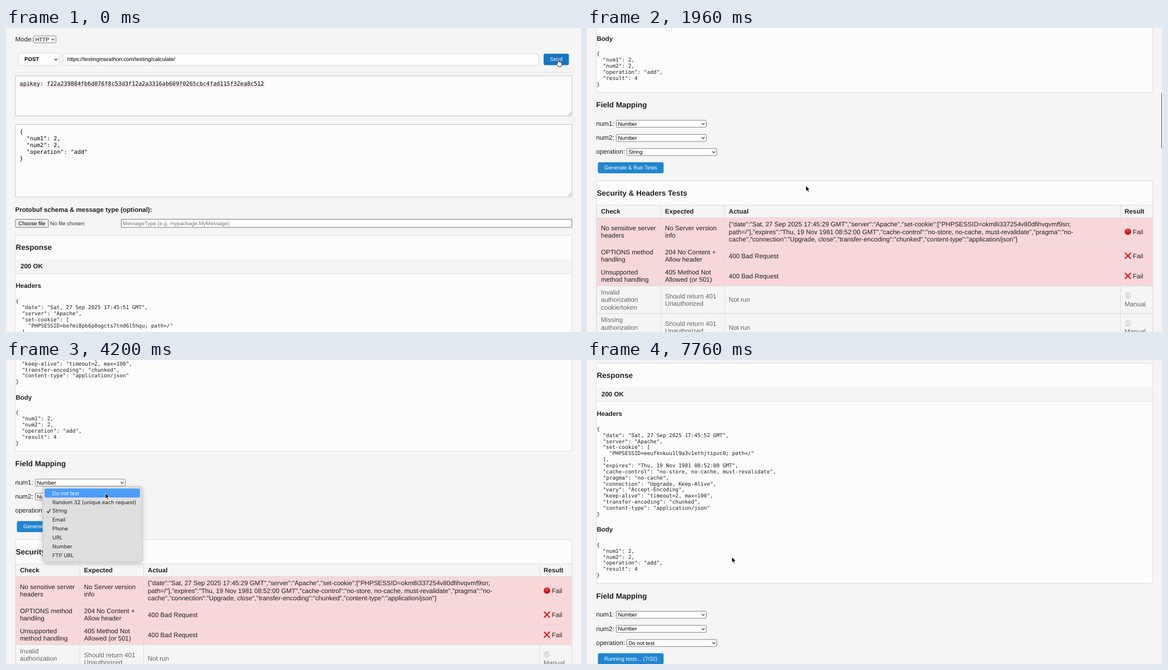
Recreate the animation shown at these times as an HTML page. Size 1030 px wide and 544 px high, loop 8000 ms.

```html
<!DOCTYPE html>
<html lang="en">
<head>
<meta charset="utf-8">
<title>API tester</title>
<style>
html, body { margin: 0; width: 1030px; height: 544px; overflow: hidden; background: #f5f5f5; }
svg { display: block; }
text { font: 11.55px "Liberation Sans", Arial, sans-serif; fill: #212121; white-space: pre; text-rendering: geometricPrecision; }
.b { font-weight: 700; }
.h { font-weight: 700; font-size: 13.52px; }
.s { font-size: 9.63px; fill: #000; }
.w { font-size: 9.63px; fill: #fff; }
.ph { font-size: 9.63px; fill: #757575; }
.g { fill: #666; }
.pre { font: 9.39px "DejaVu Sans Mono", monospace; }
.code { font: 10.11px "DejaVu Sans Mono", monospace; fill: #000; }
.menu { font: 9.36px Inter, sans-serif; fill: #222; }
</style>
</head>
<body>
<svg id="stage" width="1030" height="544" viewBox="0 0 1030 544">
  <defs>
    <radialGradient id="red" cx=".45" cy=".3" r=".7"><stop offset="0" stop-color="#f4564f"/><stop offset=".5" stop-color="#dc1c1c"/><stop offset="1" stop-color="#b80d10"/></radialGradient>
    <linearGradient id="grey" x2="0" y2="1"><stop offset="0" stop-color="#d2d2d2"/><stop offset=".5" stop-color="#e6e6e6"/><stop offset="1" stop-color="#d6d6d6"/></linearGradient>
    <filter id="shadow" x="-20%" y="-20%" width="140%" height="140%"><feDropShadow dx="0" dy="3" stdDeviation="4" flood-opacity=".2"/></filter>
  </defs>
  <g id="page"></g>
  <rect id="thumb" x="1029" width="1" height="100" fill="#5c5c5c"/>
  <g id="popup"></g>
  <g id="cursor">
    <path id="arrow" d="M0 0V10.2L2.3 8.1 3.9 11.7 5.6 11 4 7.4H7.1Z" stroke="#fff" stroke-width=".8"/>
    <g id="beam" fill="none">
      <path d="M-2.5-5.5Q0-5.5 0-4V4Q0 5.5-2.5 5.5M2.5-5.5Q0-5.5 0-4M0 4Q0 5.5 2.5 5.5M-1.3.9H1.3" stroke="#fff" stroke-width="2"/>
      <path d="M-2.5-5.5Q0-5.5 0-4V4Q0 5.5-2.5 5.5M2.5-5.5Q0-5.5 0-4M0 4Q0 5.5 2.5 5.5M-1.3.9H1.3" stroke="#111" stroke-width="1"/>
    </g>
    <path id="hand" d="M-1.3 7V1Q-1.2-.3 0-.3T1.2 1V4.2Q2.3 3.7 3 4.7 4.2 4.2 4.8 5.3 6.4 5 6.4 6.6V8.7Q6.2 10.2 5.2 11.4V12.6H-.6V11.5L-3.6 7.7Q-4.2 6.3-3 6.1-2.1 6-1.3 7Z" fill="#fff" stroke="#111" stroke-width=".9"/>
  </g>
</svg>
<script>
const LOOP = 8000;
const $ = id => document.getElementById(id);
const esc = s => s.replace(/&/g, "&amp;").replace(/</g, "&lt;");
const text = (x, y, s, cls = "", more = "") => `<text x="${x}" y="${y}" class="${cls}" ${more}>${esc(s)}</text>`;
const lines = (x, y, step, rows, cls) => rows.map((s, i) => text(x, y + i * step, s, cls)).join("");
const box = (x, y, x2, y2, fill, stroke = "none", r = 0, more = "") =>
  `<rect x="${x}" y="${y}" width="${x2 - x}" height="${y2 - y}" rx="${r}" fill="${fill}" stroke="${stroke}" ${more}/>`;
const path = (d, stroke, width = 1, more = "") => `<path d="${d}" fill="none" stroke="${stroke}" stroke-width="${width}" ${more}/>`;
const chevron = (x, y) => path(`M${x - 2.6} ${y - 1.3}l2.6 2.7 2.6-2.7`, "#222", 1.1);
const PANEL = "#fcfcfc", LINE = "#dcdcdc", FIELD = "#767676";

function select(x, y, x2, value, id = "") {
  return box(x + .5, y + .5, x2 - .5, y + 13, "#fff", FIELD, 1.5, 'stroke-width=".9"') +
    text(x + 3.4, y + 10, value, "s", id && `id="${id}"`) + chevron(x2 - 6, y + 6.8);
}

function textarea(y, y2) {
  return box(16.9, y, 1013.6, y2, PANEL, "#c6c6c6") +
    path(`M1007 ${y2 - 1}l6-6M1010.2 ${y2 - 1}l2.8-2.8`, "#777", .8);
}

function requestForm() {
  const misspelt = (x, x2) => path(`M${x} 104H${x2}`, "#e8403a", 1.2, 'stroke-dasharray="1.3 1"');
  return text(16.5, 24, "Mode:") + select(49, 13.6, 90, "HTTP") +
    box(22.5, 45, 96, 67, "#fdfdfd", "#d5d5d5", 3) + text(33, 59.4, "POST", "s b") + chevron(89.5, 56.3) +
    box(102, 45.7, 954, 66.7, "#fdfdfd", "#d5d5d5", 3) +
    text(109.8, 59.4, "https://testingmarathon.com/testing/calculate/", "s") +
    box(963, 46, 1008.3, 66.4, "#1678c2", "none", 3) + text(985.5, 59.4, "Send", "w", 'text-anchor="middle"') +
    path("M16.5 79.3H1014", LINE) +
    textarea(85.5, 157.4) +
    text(24.6, 102.8, "apikey: f22a239884fb6d076f8c53d3f12a2a3316ab609f0265cbc4fad115f32ea8c512", "code") +
    misspelt(25, 61) + misspelt(73, 463) +
    textarea(172.5, 302.3) +
    lines(24.6, 189.3, 12, ["{", '  "num1": 2,', '  "num2": 2,', '  "operation": "add"', "}"], "code") +
    text(16.5, 328.8, "Protobuf schema & message type (optional):", "b") +
    box(17, 342.4, 76, 356.8, "#efefef", FIELD, 1.5) + text(22.2, 353, "Choose file", "s") +
    text(79.3, 353, "No file chosen", "s", 'style="fill:#333"') +
    box(206.5, 342.2, 1013.6, 356.8, "#fff", FIELD) +
    text(209, 353, "MessageType (e.g. mypackage.MyMessage)", "ph");
}

function response() {
  const headers = ["{", "", '  "server": "Apache",', '  "set-cookie": [', "", "  ],",
    '  "expires": "Thu, 19 Nov 1981 08:52:00 GMT",',
    '  "cache-control": "no-store, no-cache, must-revalidate",',
    '  "pragma": "no-cache",', '  "connection": "Upgrade, Keep-Alive",', '  "vary": "Accept-Encoding",',
    '  "keep-alive": "timeout=2, max=100",', '  "transfer-encoding": "chunked",',
    '  "content-type": "application/json"', "}"];
  return box(16.9, 371, 1013.6, 765.3, PANEL, LINE) +
    text(17.4, 397, "Response", "h") +
    box(17.4, 414, 1013.1, 439.5, "#f5f5f5") + path("M17.4 439.5H1013", LINE) +
    text(26, 430, "200 OK", "b") + text(17.4, 465, "Headers", "b") +
    lines(17.2, 492.4, 10.85, headers, "pre") +
    text(17.2, 503.25, "", "pre", 'id="date"') + text(17.2, 535.8, "", "pre", 'id="cookie"') +
    text(17.4, 672.5, "Body", "b") +
    lines(17.2, 699.3, 10.85, ["{", '  "num1": 2,', '  "num2": 2,', '  "operation": "add",', '  "result": 4', "}"], "pre");
}

function mapping() {
  return text(16.5, 792, "Field Mapping", "h") +
    text(16.5, 824.8, "num1:") + select(52, 814.6, 214, "Number") +
    text(16.5, 850.1, "num2:") + select(52, 839.9, 214, "Number") +
    text(16.5, 875.4, "operation:") + select(71, 865.2, 233, "String", "operation") +
    box(19.5, 890.2, 137.2, 910, "#2185d0", "none", 3, 'id="run"') +
    text(78.3, 903.4, "", "w", 'id="runLabel" text-anchor="middle"');
}

function checks() {
  const cols = [17.5, 132.3, 246.6, 955.5, 1013.3];
  const PITCH = 13.3;
  const rows = [
    [22.5, ["Check"], ["Expected"], ["Actual"], "Result"],
    [50, ["No sensitive server", "headers"], ["No Server version", "info"], [
      '{"date":"Sat, 27 Sep 2025 17:45:29 GMT","server":"Apache","set-cookie":["PHPSESSID=okm8i337254v80dfihvqvmf9sn;',
      'path=/"],"expires":"Thu, 19 Nov 1981 08:52:00 GMT","cache-control":"no-store, no-cache, must-revalidate","pragma":"no-',
      'cache","connection":"Upgrade, close","transfer-encoding":"chunked","content-type":"application/json"}'], "ball"],
    [36, ["OPTIONS method", "handling"], ["204 No Content +", "Allow header"], ["400 Bad Request"], "cross"],
    [36, ["Unsupported", "method handling"], ["405 Method Not", "Allowed (or 501)"], ["400 Bad Request"], "cross"],
    [49.5, ["Invalid", "authorization", "cookie/token"], ["Should return 401", "Unauthorized"], ["Not run"], "manual"],
    [49.5, ["Missing", "authorization", "cookie/token"], ["Should return 401", "Unauthorized"], ["Not run"], "manual"]
  ];
  let y = 967, out = box(16.9, 923.5, 1013.6, 1260, PANEL, LINE) + text(17.4, 949.7, "Security & Headers Tests", "h");
  for (const [height, ...cells] of rows) {
    const kind = cells.pop(), mid = y + height / 2;
    const failed = kind === "ball" || kind === "cross";
    const cls = kind === "Result" ? "b" : failed ? "" : "g";
    out += box(cols[0], y, cols[4], y + height, failed ? "#f8d7da" : "#f5f5f5", LINE);
    cells.forEach((rowsOfText, i) => {
      out += lines(cols[i] + 7.5, mid + 4 - (rowsOfText.length - 1) * PITCH / 2, PITCH, rowsOfText, cls);
    });
    if (kind === "Result") out += text(963, mid + 4, kind, "b");
    if (failed) out += text(977.8, mid + 4, "Fail");
    if (kind === "ball") out += `<circle cx="968.9" cy="${mid}" r="5.8" fill="url(#red)"/>`;
    if (kind === "cross") out += path(`M964.3 ${mid - 4.5}l9.2 9.2m0-9.2l-9.2 9.2`, "#e01b22", 2.3, 'stroke-linecap="round"');
    if (kind === "manual") out += `<circle cx="968.8" cy="${mid - 7.2}" r="5.8" fill="url(#grey)"/>` + text(963, mid + 11.6, "Manual", "g");
    y += height;
  }
  for (const x of cols.slice(1, 4)) out += path(`M${x} 967V${y}`, LINE);
  return `<g id="checks">${out}</g>`;
}

const OPTIONS = ["Do not test", "Random 32 (unique each request)", "String", "Email", "Phone", "URL", "Number", "FTP URL"];
const optionY = i => 238.3 + 15.93 * i;

function popup() {
  return box(66, 226.2, 244, 361, "#dfdfde", "#b9b9b9", 5, 'stroke-width=".8" filter="url(#shadow)"') +
    box(69, 0, 240, 16, "#4a9dfb", "none", 3, 'id="glow"') +
    OPTIONS.map((s, i) => text(83, optionY(i) + 3.3, s, "menu option")).join("") +
    path("M73.4 270.6l2.2 2.8 4-6.2", "#222", 1.3, 'id="tick"');
}

$("page").innerHTML = requestForm() + response() + mapping() + checks();
$("popup").innerHTML = popup();
const optionTexts = [...document.querySelectorAll(".option")];

// The picture refreshes only at these moments.
const TICKS = [0, 450, 600, 740, 1040, 1190, 1370, 1510, 1960, 2110, 2280, 2430, 2570, 2720, 2860,
  3160, 3310, 3450, 3600, 3750, 3900, 4050, 4200, 4640, 4790, 4930, 5080, 5230, 5380, 5530, 5680,
  5830, 6270, 6420, 6720, 7020, 7160, 7610, 7760];
const TEST_DONE = [5830, 6270, 6720, 7020, 7160, 7610, 7760];
const SCROLL = [[740, 0], [1040, 120], [1190, 372], [1370, 585], [1510, 667], [1960, 650], [2110, 615],
  [2280, 602], [5680, 602], [5830, 365.5]];
const POINTER = [[0, 989.5, 56.5], [450, 930, 95], [600, 560, 240], [740, 392, 282], [1960, 392, 282],
  [2280, 273.5, 289.5], [2570, 195, 274], [2720, 180, 270], [2860, 180, 270], [3310, 179.5, 284],
  [3600, 179, 300], [4050, 178, 246], [4200, 178, 238], [4790, 178, 238], [5230, 130, 275],
  [5530, 101.5, 297], [5830, 101.5, 297], [6270, 210, 336], [6420, 259.5, 352.5]];

function track(keys, t) {
  const i = keys.findIndex(k => k[0] > t);
  if (i < 0) return keys[keys.length - 1].slice(1);
  if (i === 0) return keys[0].slice(1);
  const a = keys[i - 1], b = keys[i], p = (t - a[0]) / (b[0] - a[0]);
  return a.slice(1).map((v, n) => v + (b[n + 1] - v) * p);
}

const show = (id, on) => $(id).setAttribute("visibility", on ? "inherit" : "hidden");

function render(time) {
  const t = TICKS.filter(tick => tick <= time).pop();
  const [scroll] = track(SCROLL, t);
  const [x, y] = track(POINTER, t);
  const refreshed = t >= 600, running = t >= 5830, open = t >= 2860 && t < 4790;

  $("page").setAttribute("transform", `translate(0 ${-scroll})`);
  $("thumb").setAttribute("y", scroll * .183 - 3.2);
  show("thumb", t >= 1040 && t < 2720);

  $("date").textContent = `  "date": "Sat, 27 Sep 2025 17:45:${refreshed ? 52 : 51} GMT",`;
  $("cookie").textContent = `    "PHPSESSID=${refreshed ? "eeufknkuu1l9a3v1ethjtipvc0" : "befmi8pb6p0ogcts7tnd6l5hqu"}; path=/"`;
  $("operation").textContent = t >= 4640 ? "Do not test" : "String";

  const hover = !open && x > 19 && x < 137 && y + scroll > 890 && y + scroll < 910;
  $("run").setAttribute("fill", hover ? "#1678c2" : "#2185d0");
  $("runLabel").textContent = running
    ? `Running tests... (${TEST_DONE.filter(d => d <= t).length}/32)` : "Generate & Run Tests";
  show("checks", !running);

  show("popup", open);
  const active = t >= 4640 ? -1 : Math.round((y - 238.3) / 15.93);
  show("glow", open && active >= 0);
  $("glow").setAttribute("y", Math.round(optionY(active)) - 8);
  optionTexts.forEach((el, i) => el.style.fill = i === active ? "#fff" : "#222");
  $("tick").setAttribute("stroke", active === 2 ? "#fff" : "#222");

  $("cursor").setAttribute("transform", `translate(${x} ${y})`);
  show("hand", t < 450);
  show("beam", t >= 450 && t < 1370);
  show("arrow", t >= 1370);
}

const start = performance.now();
function loop() {
  render((performance.now() - start) % LOOP);
  requestAnimationFrame(loop);
}
loop();
</script>
</body>
</html>
```
